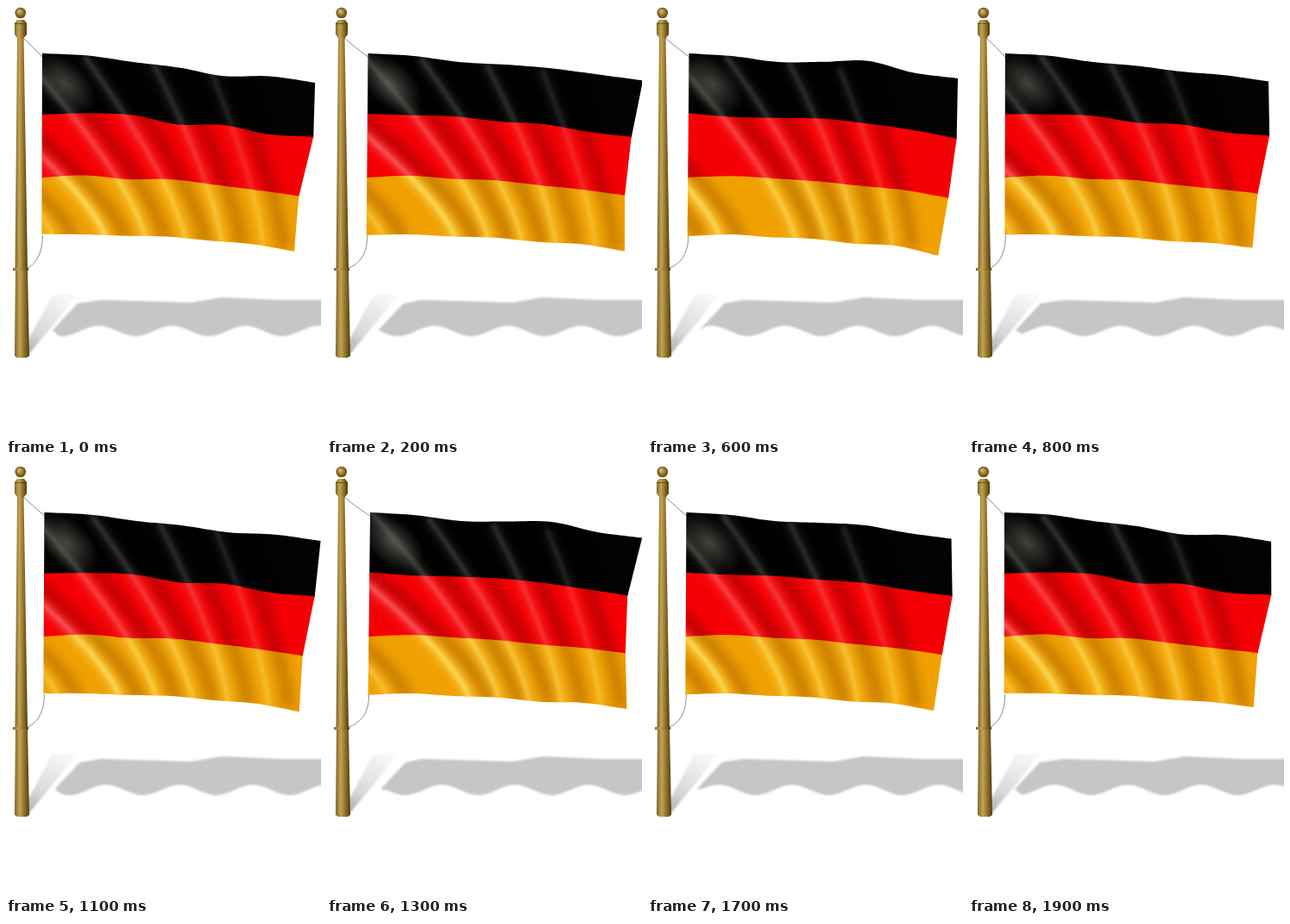
An HTML page with a canvas that plays this animation: 365 px wide and 500 px high, repeating every 2 s.

```html
<!DOCTYPE html>
<html lang="en">
<head>
<meta charset="utf-8">
<title>Waving flag</title>
<style>
  html, body { margin: 0; width: 100%; height: 100%; overflow: hidden; background: #fff; }
  canvas { display: block; }
</style>
</head>
<body>
<canvas id="stage" width="365" height="500"></canvas>
<script>
const ctx = document.getElementById('stage').getContext('2d');
const STEP = 100, STEPS = 10;

// Each seam: resting heights at seven even places from hoist to fly, and how far each place swings.
const SEAMS = [
  { rest: [55, 58, 65, 67.5, 71, 79, 86], swing: [0, -.5, 0, 4, 10.5, 2.5, 3] },
  { rest: [125, 127, 128.5, 133.5, 137, 145.5, 152], swing: [1, -2.5, -2, 4, 1, 3, -1] },
  { rest: [199, 197, 200.5, 202.5, 208, 213, 220], swing: [0, -.5, .5, -1.5, -1, 0, -1] },
  { rest: [266, 265, 267.5, 269, 274, 276.5, 285], swing: [-1.5, 0, -1, -1.5, -2, -1, -2.5] }
];

// Each fold: where it enters the hem, its travel, its backward lean and its brightness.
const FOLDS = [
  { start: 50, travel: 25, lean: 300, glow: .5 },
  { start: 100, travel: 82, lean: 240, glow: 1 },
  { start: 150, travel: 62, lean: 150, glow: .75 },
  { start: 200, travel: 43, lean: 118, glow: .62 },
  { start: 243, travel: 36, lean: 80, glow: .55 },
  { start: 292, travel: 31, lean: 62, glow: .42 }
];

const BANDS = [
  { base: '#020202', light: '150,150,142', dark: '0,0,0', gain: .55 },
  { base: '#f50005', light: '255,150,150', dark: '125,0,0', gain: .62 },
  { base: '#f0a000', light: '255,232,110', dark: '150,84,0', gain: .95 }
];

const mix = (a, b, f) => a + (b - a) * f;
const wave = (step, peak, period = STEPS) => Math.cos(2 * Math.PI * (step - peak) / period);

function foldHems(step) {
  const age = (step + 2) % STEPS;
  if (age <= 7) {
    const f = age / 7, eased = f * f * (3 - 2 * f);
    return FOLDS.map(({ start, travel }) => start + travel * eased);
  }
  // Every fold takes the place of the next one while a new one enters.
  return FOLDS.map(({ start }, i) => {
    const before = FOLDS[i - 1];
    return mix(before ? before.start + before.travel : 30, start, (age - 7) / 3);
  });
}

function poseAt(step) {
  const sway = wave(step, 4), flick = wave(step, .7, 5), swing = wave(step, -.3);
  return {
    hoist: [0, 1, 2, 3].map(k => 46 - k * .5 + (5 - k * .4) * sway),
    fly: [
      359 + 9 * wave(step, 3) + 3 * flick,
      353 + 5 * flick,
      343 + 7 * sway + 3 * flick,
      338 + 9.5 * wave(step, 3.2)
    ],
    seams: SEAMS.map((seam, k) => seam.rest.map((y, i) =>
      y + seam.swing[i] * swing + k * 1.1 * flick * (i / 6) ** 6)),
    folds: foldHems(step)
  };
}

function spline(ys, u) {
  const last = ys.length - 1, p = u * last;
  const i = Math.min(last - 1, Math.floor(p)), t = p - i;
  const b = ys[i], c = ys[i + 1];
  const a = i ? ys[i - 1] : 2 * b - c;
  const d = i + 2 <= last ? ys[i + 2] : 2 * c - b;
  return b + t / 2 * (c - a + t * (2 * a - 5 * b + 4 * c - d + t * (3 * (b - c) + d - a)));
}

function seamPoints(pose, k, drop = 0) {
  return Array.from({ length: 61 }, (_, n) => {
    const u = n / 60;
    return [mix(pose.hoist[k], pose.fly[k], u), spline(pose.seams[k], u) + drop];
  });
}

function trace(points) {
  ctx.beginPath();
  points.forEach(([x, y]) => ctx.lineTo(x, y));
}

function foldPoints(hem, lean) {
  return Array.from({ length: 25 }, (_, n) => {
    const v = n / 24;
    const x = hem - lean * (1 - v) ** 1.4;
    return [x, mix(53 + (x - 43) * .1, 268 + (x - 43) * .05, v)];
  });
}

function strokeFold(points, color, width, blur) {
  ctx.filter = `blur(${blur}px)`;
  ctx.strokeStyle = color;
  ctx.lineWidth = width;
  trace(points);
  ctx.stroke();
}

function drawBand(pose, k) {
  const { base, light, dark, gain } = BANDS[k];
  ctx.save();
  trace([...seamPoints(pose, k), ...seamPoints(pose, k + 1, k < 2 ? 1 : 0).reverse()]);
  ctx.fillStyle = base;
  ctx.fill();
  ctx.clip();
  pose.folds.forEach((hem, i) =>
    strokeFold(foldPoints(hem + 23, FOLDS[i].lean), `rgba(${dark},.42)`, 15, 6));
  pose.folds.forEach((hem, i) => {
    const path = foldPoints(hem, FOLDS[i].lean), a = FOLDS[i].glow * gain;
    strokeFold(path, `rgba(${light},${a * .5})`, 13, 5);
    strokeFold(path, `rgba(${light},${a * .8})`, 4, 2);
  });
  if (k === 0) drawSheen(pose.hoist[0] + 26);
  ctx.restore();
}

function drawSheen(x) {
  ctx.filter = 'none';
  ctx.translate(x, 90);
  ctx.rotate(.75);
  ctx.scale(1.7, 1);
  const g = ctx.createRadialGradient(0, 0, 0, 0, 0, 26);
  g.addColorStop(0, 'rgba(120,120,112,.55)');
  g.addColorStop(1, 'rgba(120,120,112,0)');
  ctx.fillStyle = g;
  ctx.fillRect(-30, -30, 60, 60);
}

function drawShadow(pose, step) {
  const left = pose.hoist[0] + 12;
  const hem = [];
  for (let x = 370; x >= left + 7; x -= 3)
    hem.push([x, 377 + 6 * Math.cos(2 * Math.PI * ((x - 150) / 85 - step / STEPS))]);
  ctx.save();
  ctx.filter = 'blur(1px)';
  const g = ctx.createLinearGradient(24, 405, 66, 335);
  g.addColorStop(0, '#aaa');
  g.addColorStop(.35, '#d8d8d8');
  g.addColorStop(1, '#f8f8f8');
  ctx.fillStyle = g;
  trace([[24, 407], [26, 387], [54, 335], [82, 335], [58, 366]]);
  ctx.fill();
  ctx.fillStyle = '#c6c6c6';
  trace([[left, 376], [left + 29, 345], [110, 341], [215, 344], [250, 338], [315, 341], [370, 341], ...hem]);
  ctx.fill();
  ctx.restore();
}

function metal(left, right) {
  const g = ctx.createLinearGradient(left, 0, right, 0);
  g.addColorStop(0, '#7d642a');
  g.addColorStop(.35, '#c2a452');
  g.addColorStop(.6, '#9a7b30');
  g.addColorStop(1, '#513d10');
  return g;
}

function taper(top, bottom, topLeft, topRight, left, right) {
  ctx.fillStyle = metal(Math.min(left, topLeft), Math.max(right, topRight));
  trace([[topLeft, top], [topRight, top], [right, bottom], [left, bottom]]);
  ctx.fill();
}

function drawPole() {
  taper(36, 305, 13, 20.5, 10.5, 25);
  taper(305, 406, 11, 25, 10, 27);
  taper(406, 408, 10, 27, 13, 24);
  taper(304, 307, 8, 26, 8, 26);
  taper(16, 20, 13, 21, 10, 24);
  taper(20, 33, 10, 24, 10, 24);
  taper(33, 37, 10, 24, 13, 21);
  ctx.fillStyle = 'rgba(70,52,12,.6)';
  ctx.fillRect(10, 20, 14, 1);
  const ball = ctx.createRadialGradient(15, 6, 1, 17, 8, 6.5);
  ball.addColorStop(0, '#d0b566');
  ball.addColorStop(.5, '#96782e');
  ball.addColorStop(1, '#574213');
  ctx.fillStyle = ball;
  ctx.beginPath();
  ctx.arc(16.8, 8, 6.3, 0, 2 * Math.PI);
  ctx.fill();
}

function drawRopes(pose) {
  ctx.strokeStyle = '#8c8c88';
  ctx.lineWidth = 1;
  ctx.beginPath();
  ctx.moveTo(20, 37);
  ctx.quadraticCurveTo(31, 47, pose.hoist[0], pose.seams[0][0] + 4);
  const x = pose.hoist[3];
  ctx.moveTo(x + 1, 266);
  ctx.bezierCurveTo(x + 1, 281, x - 3, 297, 25, 304);
  ctx.stroke();
}

function draw(step) {
  const pose = poseAt(step);
  ctx.fillStyle = '#fff';
  ctx.fillRect(0, 0, 365, 500);
  drawShadow(pose, step);
  drawRopes(pose);
  BANDS.forEach((_, k) => drawBand(pose, k));
  drawPole();
}

const start = performance.now();
let shown = -1;
function tick() {
  const step = Math.floor((performance.now() - start) / STEP) % STEPS;
  if (step !== shown) draw(shown = step);
  requestAnimationFrame(tick);
}
tick();
</script>
</body>
</html>
```
